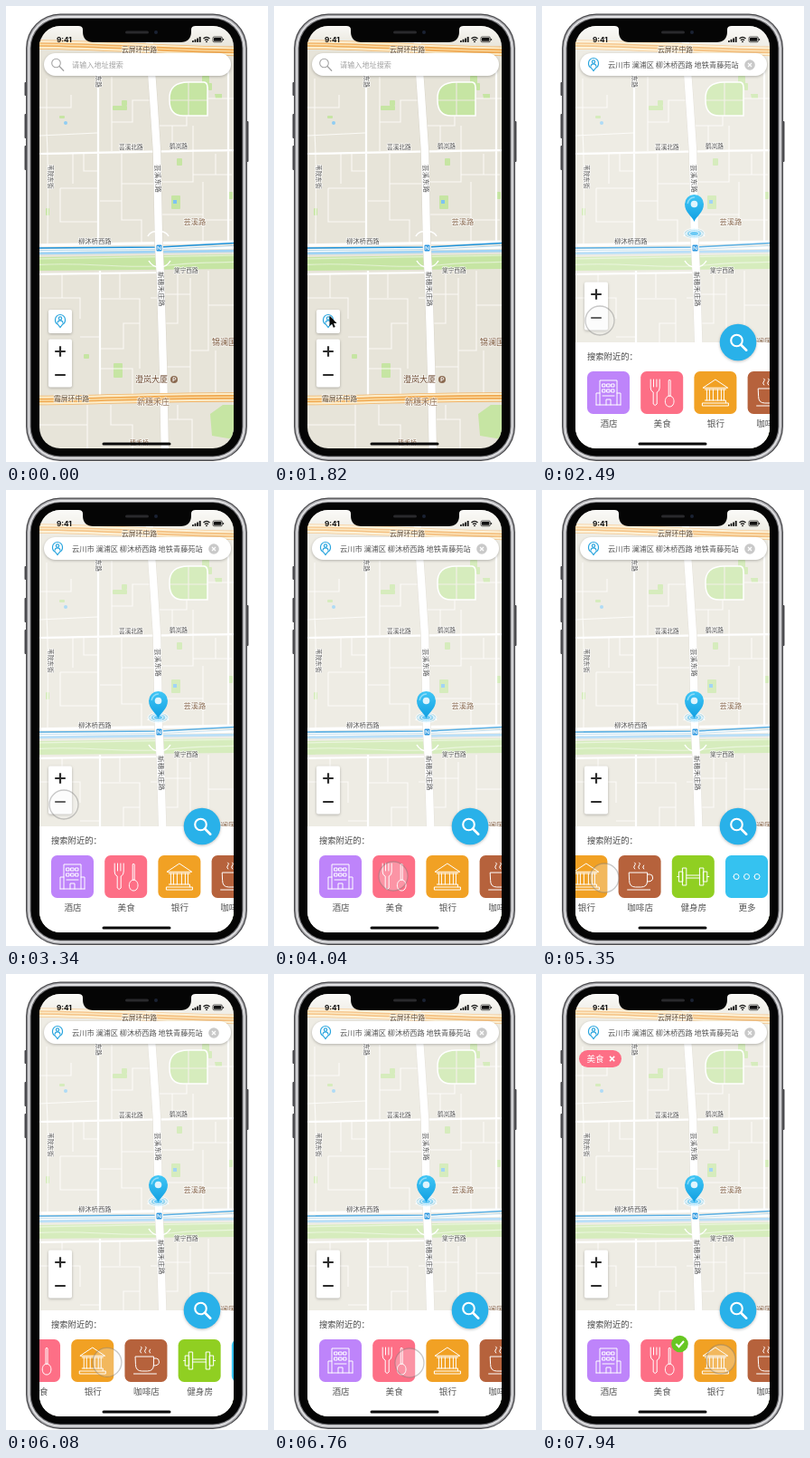
Animation, 290 px wide and 503 px high, one loop 8000 ms. Source, as an HTML page:

```html
<!DOCTYPE html>
<html lang="zh-CN">
<head>
<meta charset="utf-8">
<title>地图搜索</title>
<style>
html, body { margin: 0; width: 100%; height: 100%; overflow: hidden; background: #fff; }
svg { display: block; width: 100%; height: 100%; }
text { font-family: "Noto Sans CJK SC", "Noto Sans CJK", "Noto Sans", sans-serif; }
.shadow { filter: drop-shadow(0 1px 1.5px rgba(0, 0, 0, .25)); }
.line { fill: none; stroke: #fff; stroke-width: 1; stroke-linecap: round; stroke-linejoin: round; }
</style>
</head>
<body>
<svg id="stage" viewBox="0 0 290 503" xmlns="http://www.w3.org/2000/svg"></svg>
<script>
const LOOP = 8000, PITCH = 59.2, SWIPE = -143;
const GREEN = '#c6e5a3';

const rect = (x, y, w, h, fill, r = 0) =>
  `<rect x="${x}" y="${y}" width="${w}" height="${h}" rx="${r}" fill="${fill}"/>`;
const path = (d, color, width, extra = '') =>
  `<path d="${d}" fill="none" stroke="${color}" stroke-width="${width}" ${extra}/>`;
const area = (d, fill) => `<path d="${d}" fill="${fill}"/>`;
const dot = (x, y, r, fill, extra = '') =>
  `<circle cx="${x}" cy="${y}" r="${r}" fill="${fill}" ${extra}/>`;
// y is the middle of the line
const text = (s, x, y, size, fill, extra = '') =>
  `<text x="${x}" y="${y + size * .36}" font-size="${size}" fill="${fill}" ${extra}>${s}</text>`;
const group = (id, body, extra = '') => `<g id="${id}" ${extra}>${body}</g>`;

const HALO = 'paint-order="stroke" stroke="#fff" stroke-opacity=".7" stroke-width="1.4"';
const label = (s, x, y, size, fill = '#565656', extra = '') => text(s, x, y, size, fill, HALO + extra);
const roadLabel = (s, x, y, size, turn = 90) =>
  `<g transform="translate(${x} ${y}) rotate(${turn})">${label(s, 0, 0, size)}</g>`;

function ringRoad(y0, y1) {
  const d = `M30 ${y0}C100 ${y0} 180 ${y1 - 1} 260 ${y1}`;
  return path(d, '#f0b469', 10.5) + path(d, '#fcecc8', 8.8) + path(d, '#f0a850', 4.6) + path(d, '#fbdda6', 1.4);
}

function mapShapes() {
  const greens = [
    [217, 77, 8, 12], [224, 85, 4, 8], [118, 110, 16, 5], [128, 104, 6, 6], [59, 121, 6, 3],
    [189, 168, 6, 8], [183, 209, 10, 15], [246, 205, 5, 8], [119, 394, 10, 16], [86, 384, 6, 5], [44, 223, 4, 8]
  ].map(b => rect(...b, GREEN, 1)).join('');
  const loop = 'M181 104C180 90 188 84 202 84H219C224 84 223 90 223 100V121H196C186 121 181 115 181 104Z';
  const thin = 'M37 112H72V98M45 80V140Q47 170 46 262M37 143L101 140M60 201H101M60 201V238H101M117 78V160' +
    'M117 128H140V104H165M74 163V196M86 163V182H101M128 163V196H166M128 196V236H150V262M104 215H128' +
    'M168 132H200V121M184 132V160M207 132V186H250M232 163V186M172 194H207V186M218 194V236H250M172 230H218V262' +
    'M224 102H252M37 322H82V345M62 296V322M126 294V322M104 323H148V350H130V378H104M148 350V400M160 322H172' +
    'M104 400H140V428M82 365H104M172 318H204M190 292V350H174M204 300V428M224 292V330H252M224 330V380H204' +
    'M232 380V428M176 398H204M90 440V490M116 440V462H140V490M37 462H90M178 456H206V490M190 440V456';
  return greens
    + area(loop, GREEN) + path('M202 84V121M181 104H223', '#edeadf', 1.2) + path(loop, '#fff', 1.5)
    + area('M226 450L240 440H252V478L228 474Z', GREEN)
    + dot(66, 129, 2, '#8fcdf3') + rect(185, 214, 4, 4, '#7ec3f2') + area('M231 97h8v5h-7z', GREEN)
    + path(thin, '#fbfaf6', 1.1)
    + path('M30 163C90 163 150 160 260 159M102 70V262M104 292V430M246 70V262M30 296L172 294', '#fff', 2.2)
    + area('M30 277L260 274V290L30 292Z', GREEN)
    + path('M30 279L260 275M30 286C80 281 130 291 180 286S230 284 260 282', '#e2f1d0', 1.2)
    + path('M30 264L260 260M30 270L260 266', '#fff', 3.4)
    + path('M30 273L260 270', '#9fd3f5', 2.8)
    + path('M30 267L170 266L260 261', '#1d93dc', 1.6)
    + path('M30 269.6L170 268.6L260 264', '#9ac9e4', .8)
    + path('M158 30L163 100L167 160L169 260L171 300L174 400L176 500', '#d9d5ca', 9.4)
    + path('M158 30L163 100L167 160L169 260L171 300L174 400L176 500', '#fff', 8.4)
    + path('M157 254Q160 248 168 249Q177 248 180 254M158 281Q162 288 170 288Q178 288 182 281', '#fff', 1.5)
    + ringRoad(42.5, 50) + ringRoad(435, 431.5);
}

function mapLabels() {
  const brown = '#8a6a4f';
  return label('云屏环中路', 128, 48, 7.8, '#5b4a35')
    + label('芸溪北路', 125, 156, 6.7) + label('鹤岚路', 181, 155, 6.7)
    + label('柳沐桥西路', 80, 259, 7.3) + label('棠宁西路', 186, 292, 6.7)
    + label('芸溪路', 196.5, 238, 8.2, brown)
    + label('锦澜国', 228, 371, 9, '#7b5638')
    + label('澄岚大厦', 143, 412, 9, '#6b482e')
    + label('新穗禾庄', 145, 437, 9, brown)
    + label('霜屏环中路', 53, 433.5, 7.8, '#5b4a35', ' font-weight="500"')
    + label('穗禾桥', 137, 481, 7, brown)
    + roadLabel('芸溪东路', 167.5, 175, 7.7, 88) + roadLabel('新穗禾庄路', 171, 293, 7.7, 88)
    + roadLabel('苇院东街', 49, 175, 6.7) + roadLabel('溪东路', 102.5, 70, 6.7)
    + dot(186, 412, 4, '#8b6a50') + path('M185 414.3V409.8H186.6A1.3 1.3 0 0 1 186.6 412.4H185', '#fff', .9)
    + rect(166.5, 263.5, 6, 7, '#2c97e0', 1) + path('M168 269V265L171 269V265', '#fff', .9);
}

const placeIcon = (x, y) => `<g transform="translate(${x} ${y})">`
  + '<path d="M-2.6 3.6C-5 2.4-5.6 0-5.5-1.5A5.5 5.5 0 0 1 5.5-1.5C5.6 0 5 2.4 2.6 3.6L0 7Z" fill="#fff" stroke="#2aa5de" stroke-width="1.2"/>'
  + dot(0, -2.9, 1.7, '#fff', 'stroke="#2aa5de" stroke-width="1.1"')
  + path('M-3 2.2Q-2.6-.6 0-.6T3 2.2', '#2aa5de', 1.1) + '</g>';

const lens = (x, y, r, color, w) =>
  `<circle cx="${x}" cy="${y}" r="${r}" fill="none" stroke="${color}" stroke-width="${w}"/>`
  + path(`M${x + r * .75} ${y + r * .75}l${r * .95} ${r * .95}`, color, w * 1.25, 'stroke-linecap="round"');

const icons = [
  'M14 37V10H33V37M10 37H37M14 24H10V37M33 24H37V37M17 14H20V17H17ZM22 14H25V17H22ZM27 14H30V17H27ZM17 20H20V23H17ZM22 20H25V23H22ZM27 20H30V23H27ZM17 27H30M21 37V31H26V37',
  'M11 9V18Q11 22 14 23V36Q16 39 18 36V23Q21 22 21 18V9M14.3 9V17M17.7 9V17M31 27V10Q32 8 33 10V27M32 27C25.5 27 25.5 39 32 39S38.5 27 32 27',
  'M10 18L23.5 9L37 18ZM12 20H35M14 20V32M17 20V32M21 20V32M26 20V32M30 20V32M33 20V32M12 32H35V35H9V38H38V35H35',
  'M12 19H32V28Q32 35 25 35H19Q12 35 12 28ZM32 21H35Q38 21 38 25T32 29M10 38H35M18 15Q16 13 18 11T18 8M23 15Q21 13 23 11T23 8M28 15Q26 13 28 11',
  'M16 22H31M16 25H31M12 14H16V33H12ZM31 14H35V33H31ZM8 18H12V29H8ZM35 18H39V29H35ZM6 23.5H8M39 23.5H41',
  'M9 23.5a3 3 0 1 0 6 0a3 3 0 1 0-6 0M20.5 23.5a3 3 0 1 0 6 0a3 3 0 1 0-6 0M32 23.5a3 3 0 1 0 6 0a3 3 0 1 0-6 0'
];
const kinds = [['酒店', '#be84fa'], ['美食', '#fd6f86'], ['银行', '#f1a124'],
  ['咖啡店', '#b6623c'], ['健身房', '#90cf22'], ['更多', '#35c2f0']];

const tiles = () => kinds.map(([name, color], i) =>
  `<g transform="translate(${50 + i * PITCH} 403)">` + rect(0, 0, 47, 47, color, 6.5)
  + `<path class="line" d="${icons[i]}"/>`
  + text(name, 24, 58, 9.6, '#555', 'text-anchor="middle"') + '</g>').join('');

function phone() {
  const buttons = [[20.5, 84, 15], [20.5, 119, 27], [20.5, 154, 27], [265.5, 127, 45]]
    .map(([x, y, h]) => rect(x, y, 3, h, '#4c4c50', 1)).join('');
  // nested shells from the outer edge to the bezel
  const shells = [[0, '#4a4a4d'], [1.3, '#a9a9ad'], [2.6, '#e2e2e4'], [4.4, '#77777b'], [5.6, '#050505']];
  return buttons + shells.map(([d, color]) =>
    rect(22 + d, 8.5 + d, 245 - 2 * d, 493.5 - 2 * d, color, 38 - d)).join('');
}

function statusBar() {
  const bars = [2, 3.3, 4.6, 6].map((h, i) => rect(206 + i * 2.6, 40 - h, 1.8, h, '#111', .4)).join('');
  return '<path d="M80 20H210V22Q205 22 205 26V28Q205 40 193 40H97Q85 40 85 28V26Q85 22 80 22Z" fill="#050505"/>'
    + rect(132, 27.5, 26, 3, '#29292c', 1.5) + dot(166, 29, 2, '#1b2233')
    + text('9:41', 56, 37, 8.2, '#111', 'font-weight="700" style="font-family:Inter,sans-serif"')
    + bars + path('M218.5 36Q222 32.6 225.5 36M220 37.8Q222 35.8 224 37.8', '#111', 1.2) + dot(222, 39.3, .9, '#111')
    + `<rect x="229" y="34" width="10.4" height="5.8" rx="1.4" fill="none" stroke="#111" stroke-width=".7"/>`
    + rect(230, 35, 8.4, 3.8, '#111', .6) + rect(240.2, 36, .9, 2, '#111');
}

const pinShape = '<path d="M0 0C-2-6-10.5-10-10.5-19.5A10.5 10.5 0 0 1 10.5-19.5C10.5-10 2-6 0 0Z" fill="url(#blue)"/>'
  + dot(0, -19.5, 3.8, '#dff4fd') + path('M-7.2-20.5A7.4 7.4 0 0 1 0-27', '#8edcf8', 1.4, 'stroke-linecap="round"');

document.getElementById('stage').innerHTML = `<defs>
  <clipPath id="screen">${rect(37, 22, 215, 466, '#000', 23)}</clipPath>
  <linearGradient id="blue" x2="0" y2="1"><stop stop-color="#41c6f5"/><stop offset="1" stop-color="#109fe2"/></linearGradient>
  <linearGradient id="haze" x2="0" y2="1"><stop stop-color="#fff" stop-opacity=".75"/><stop offset="1" stop-color="#fff" stop-opacity="0"/></linearGradient>
  </defs>`
  + phone()
  + '<g clip-path="url(#screen)">'
  + rect(37, 22, 215, 466, '#e7e4d9') + mapShapes()
  + group('tint', rect(37, 22, 215, 466, '#fff'))
  + rect(37, 22, 215, 24, 'url(#haze)')
  + mapLabels()
  + group('ripple', [[11.5, .25], [8.5, .4], [5, .6]].map(([r, o]) =>
      `<ellipse rx="${r}" ry="${r * .5}" fill="#4dbef3" fill-opacity="${o}" stroke="#fff" stroke-width=".8"/>`).join(''))
  + group('pin', pinShape)
  + group('locate', rect(47, 335, 26, 26, '#fff', 2) + placeIcon(60, 347.5), 'class="shadow"')
  + group('zoom', rect(47, 367.5, 26, 53, '#fff', 2)
      + path('M54.2 381H65.8M60 375.2V386.8M54.2 407H65.8', '#2c2c2c', 2.2), 'class="shadow"')
  + '<g class="shadow">' + rect(42, 52, 207, 25, '#fff', 12.5) + '</g>'
  + group('empty', lens(55.5, 63, 4.8, '#a5a5a5', 1.1) + text('请输入地址搜索', 73, 65, 8.15, '#a2a2a2'))
  + group('address', placeIcon(57, 64.5)
      + text('云川市 澜浦区 柳沐桥西路 地铁青藤苑站', 73, 65, 8.2, '#555')
      + dot(230, 65, 5.8, '#c9c9c9') + path('M228 63L232 67M232 63L228 67', '#fff', 1.1))
  + group('tag', rect(-23.5, -9.5, 47, 19, '#fd6f86', 9.5) + text('美食', -15, 0, 9.6, '#fff')
      + path('M10.5 -2.6L15.7 2.6M15.7 -2.6L10.5 2.6', '#fff', 1.6))
  + group('panel', rect(37, 371, 215, 125, '#fff') + text('搜索附近的：', 50, 386.5, 9.3, '#444')
      + group('strip', tiles() + group('check', dot(0, 0, 9.3, '#67c722')
        + path('M-4.2 0L-1 3.2L4.5 -3', '#fff', 2))))
  + group('fab', '<g class="shadow">' + dot(0, 0, 20.3, '#29b1e9') + '</g>' + lens(-1.5, -2, 6.3, '#fff', 2.1))
  + rect(106.5, 481.5, 76, 3, '#0a0a0a', 1.5)
  + group('touch', dot(0, 0, 16, '#f4f4f4', 'fill-opacity=".28" stroke="#777" stroke-opacity=".4" stroke-width="1.3"'))
  + '</g>' + statusBar()
  + group('cursor', area('M0 0V14.5L3.3 11.5L5.4 16.6L7.8 15.6L5.7 10.7H10Z', '#0a0a0a'));

const part = {};
document.querySelectorAll('#stage g[id]').forEach(g => part[g.id] = g);

const span = (t, a, b) => Math.min(1, Math.max(0, (t - a) / (b - a)));
const out = p => 1 - (1 - p) ** 3;
const both = p => p * p * (3 - 2 * p);
const move = (id, x, y, s = 1) => part[id].setAttribute('transform', `translate(${x} ${y}) scale(${s})`);
const fade = (id, o) => part[id].setAttribute('opacity', o);

// time, x, y
const touchPath = [[3340, 64, 347], [4040, 132, 426], [4220, 200, 428], [4790, 200, 428], [5350, 69, 428],
  [5790, 69, 428], [6550, 200, 429], [6670, 185, 429], [6760, 150, 429], [6960, 134, 428],
  [7250, 134, 428], [7640, 198, 425]];

function touchAt(t) {
  let [t0, x, y] = touchPath[0];
  for (const [t1, x1, y1] of touchPath) {
    if (t < t1) {
      const p = both(span(t, t0, t1));
      return [x + (x1 - x) * p, y + (y1 - y) * p];
    }
    [t0, x, y] = [t1, x1, y1];
  }
  return [x, y];
}

function draw(t) {
  const reach = both(span(t, 1080, 1820));
  move('cursor', 20 + 41.5 * reach, 444 - 102.5 * reach, .8);
  fade('cursor', t < 1080 ? 0 : 1 - span(t, 1900, 2040));

  const open = out(span(t, 2100, 2480));
  const found = t >= 2140 ? 1 : 0;
  fade('tint', .28 * open);
  fade('empty', 1 - found);
  fade('address', found);
  fade('locate', 1 - span(t, 2120, 2300));
  move('zoom', 0, -63 * open);
  move('panel', 0, 120 * (1 - open));
  move('fab', 217, 371, out(span(t, 2220, 2480)));

  const drop = span(t, 2490, 2800);
  move('pin', 168.5, t < 2490 ? 238 - 60 * (1 - span(t, 2260, 2490)) : 238 + 14 * both(drop));
  fade('pin', span(t, 2260, 2400));
  move('ripple', 168.5, 251);
  fade('ripple', span(t, 2370, 2490));

  const swipe = both(span(t, 4790, 5350)) - both(span(t, 5790, 6550));
  move('strip', SWIPE * swipe, 0);

  const [x, y] = touchAt(t);
  move('touch', x, y);
  fade('touch', span(t, 2120, 2260));

  const pick = out(span(t, 7120, 7420));
  move('tag', 64.5, 93.5, .5 + .5 * pick);
  fade('tag', pick);
  move('check', 152.5, 408, pick);
}

const start = performance.now();
function tick() {
  draw((performance.now() - start) % LOOP);
  requestAnimationFrame(tick);
}
tick();
</script>
</body>
</html>
```
